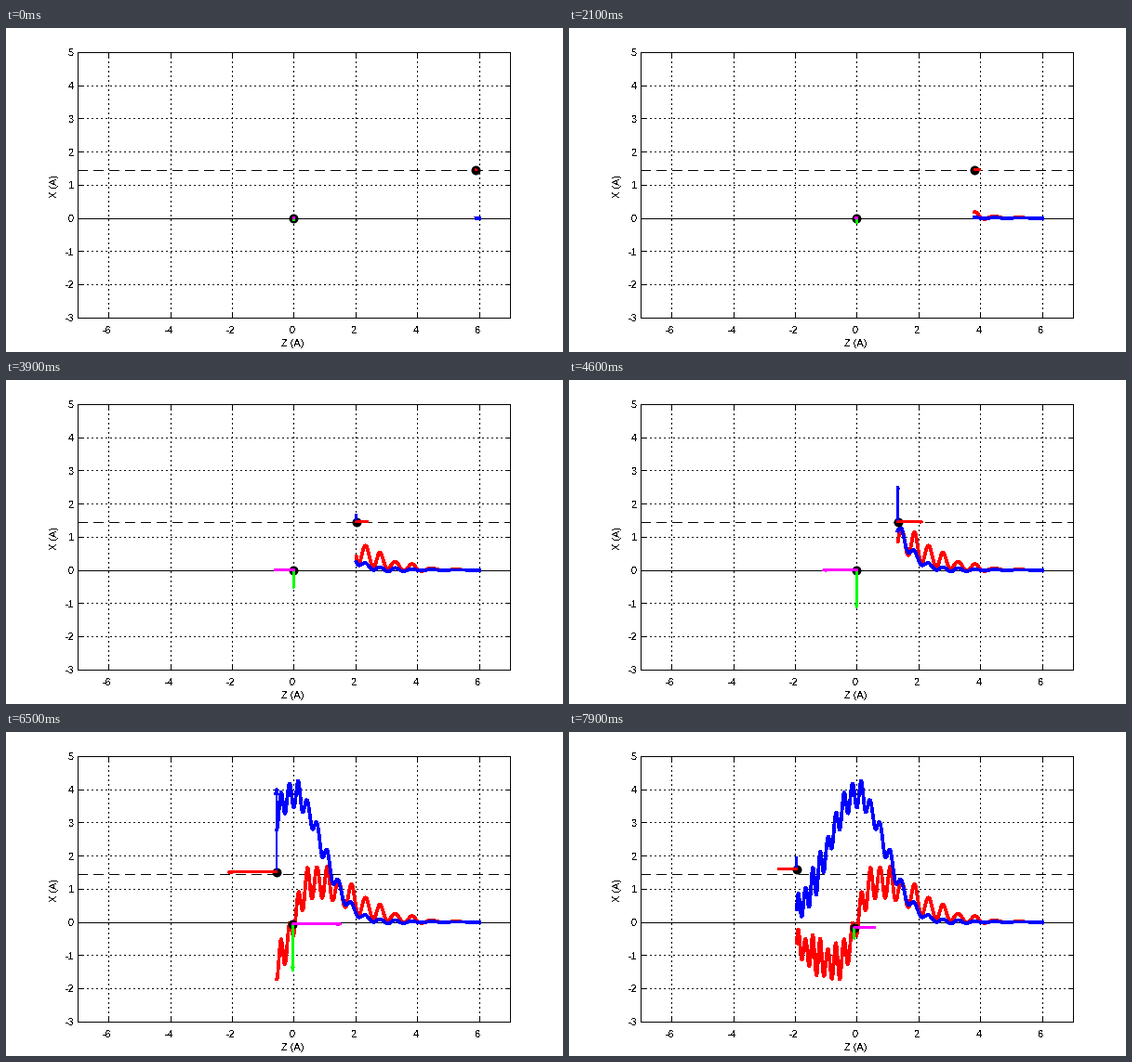
Animation, 599 px wide and 349 px high, one loop 8000 ms. Source, as a matplotlib script:

```python
import numpy as np
import matplotlib.pyplot as plt
from matplotlib.animation import FuncAnimation

W, H, DPI = 599, 349, 64
PX = 72 / DPI  # points per pixel
FRAMES = 80
DASH_Y = 1.45
START_Z = 5.9
SPEED = .0993  # per frame
ARROW_SCALE = .9

plt.rcParams.update({
    "font.family": "Liberation Sans",
    "font.size": 11 * PX,
    "text.antialiased": False,
    "lines.scale_dashes": False,
})

rng = np.random.default_rng(4)
gain_z, gain_x = rng.uniform(.6, 1.5, (2, 24))


def ripple(z, gains):
    """Ripple that quickens towards small z, with uneven peaks."""
    d = 5.3 - z
    cycle = 1.03 * d + .235 * d ** 2 - .55 / (1 + np.exp(3 * (z - 1.9)))
    return np.interp(cycle, np.arange(len(gains)), gains) * np.cos(2 * np.pi * cycle)


def force_z(z):
    mean = 1.5 * np.tanh(2.2 * z) * np.exp(-.22 * z ** 2)
    return mean + .4 / (1 + np.exp(1.6 * (z - 3))) * ripple(z, gain_z)


def force_x(z):
    mean = 3.85 * np.exp(-.62 * z ** 2)
    return mean + .45 / (1 + np.exp(z - 1)) * ripple(z, gain_x)


def rest_z(z):
    return -1.7 * np.tanh(2.5 * (z - .33)) * np.exp(-.25 * z ** 2)


def rest_x(z):
    return -3 / (1 + 1.6 * (z - .3) ** 2)


fig = plt.figure(figsize=(W / DPI, H / DPI), dpi=DPI, facecolor="white")
ax = fig.add_axes([76.9 / W, 37.1 / H, 465 / W, 286 / H])
ax.set(xlim=(-7, 7), ylim=(-3, 5), xticks=range(-6, 7, 2), yticks=range(-3, 6))
ax.set_axisbelow(True)
ax.grid(color="black", lw=.9 * PX, ls=(.5 * PX, (PX, 3 * PX)), antialiased=False)
ax.tick_params(direction="in", length=5 * PX, width=PX, top=True, right=True,
               labelbottom=False, labelleft=False)
for spine in ax.spines.values():
    spine.set_linewidth(PX)


def label(x, y, s, **kw):
    fig.text(x / W, 1 - y / H, s, **kw)


for z in range(-6, 7, 2):
    label(308 + z * 33.2, 329, str(z), ha="center")
for x in range(-3, 6):
    label(73, 209 - x * 35.75, str(x), ha="right")
label(308, 343, "Z (A)", ha="center")
label(52, 170, "X (A)", ha="center", va="center", rotation=90)


def line(color, width, order, **kw):
    return ax.plot([], [], color=color, lw=width * PX, zorder=order,
                   antialiased=False, **kw)[0]


line("black", 1, 2).set_data([-7, 7], [0, 0])
line("black", 1, 2, ls=(0, (10 * PX, 6 * PX)),
     dash_capstyle="butt").set_data([-7, 7], [DASH_Y, DASH_Y])

trail_z = line("red", 2.7, 3, solid_joinstyle="round")
trail_x = line("blue", 2.7, 4, solid_joinstyle="round")
atoms = line("black", 0, 5, ls="none", marker="o", ms=10 * PX, mew=0)
arrows = [line(c, 1.9, 6, solid_capstyle="round")
          for c in ("blue", "red", "lime", "magenta")]


def point(arrow, z, x, dz, dx):
    """Arrow from (z, x) with a small open head."""
    tip_z, tip_x = z + dz, x + dx
    back_z, back_x = tip_z - .06 * dz, tip_x - .06 * dx
    side_z, side_x = .015 * dx, .015 * dz
    arrow.set_data([z, tip_z, back_z + side_z, tip_z, back_z - side_z],
                   [x, tip_x, back_x - side_x, tip_x, back_x + side_x])


def update(n):
    z = START_Z - SPEED * n
    after = max(0, n - 57)  # both atoms drift apart once they have met
    x = DASH_Y + .0067 * after
    bz, bx = -.0035 * after, -.0075 * after
    path = np.linspace(6, z, 40 + 12 * n)
    trail_z.set_data(path, force_z(path))
    trail_x.set_data(path, force_x(path))
    atoms.set_data([z, bz], [x, bx])
    point(arrows[0], z, x, 0, ARROW_SCALE * force_x(z))
    point(arrows[1], z, x, ARROW_SCALE * force_z(z), 0)
    point(arrows[2], bz, bx, 0, rest_x(z))
    point(arrows[3], bz, bx, rest_z(z), 0)
    return [trail_z, trail_x, atoms, *arrows]


anim = FuncAnimation(fig, update, frames=FRAMES, interval=100, repeat=True,
                     repeat_delay=0, blit=False)
plt.show()
```
